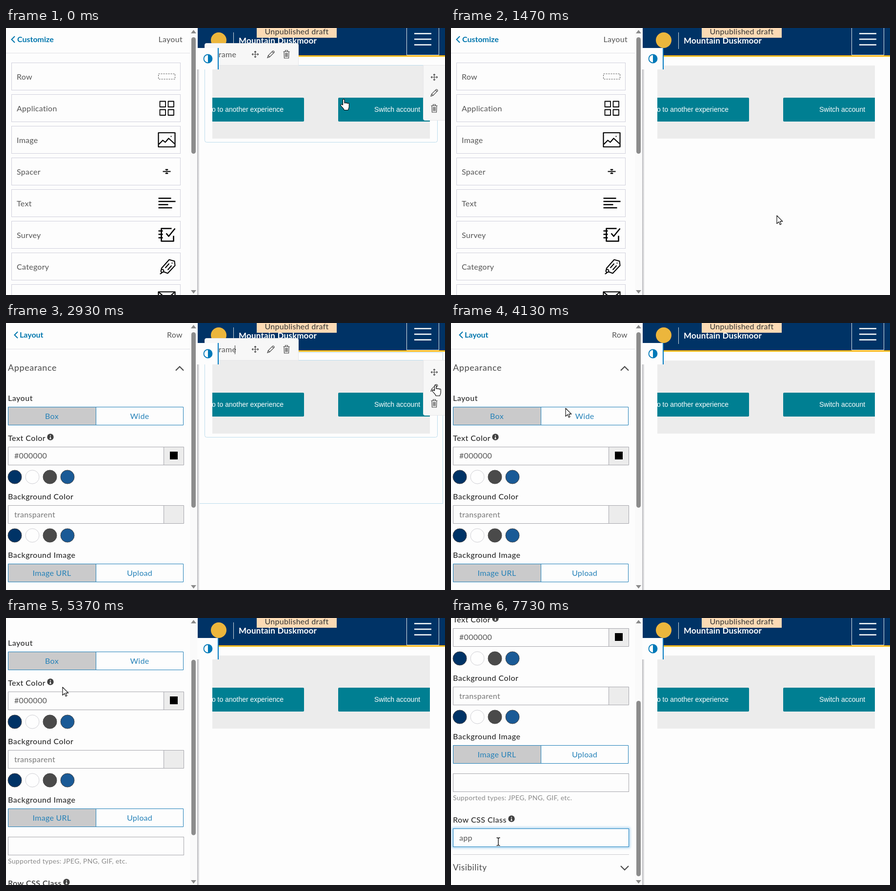
Recreate the animation shown at these times as an HTML page. Size 900 by 548 pixels, loop 8000 ms.

```html
<!DOCTYPE html>
<html lang="en">
<head>
<meta charset="utf-8">
<title>Page editor</title>
<style>
html, body { margin: 0; width: 100%; height: 100%; overflow: hidden; background: #fdfdfd; }
svg { display: block; }
#stage { width: 900px; height: 548px; }
text { font: 16px Lato, "Open Sans", sans-serif; letter-spacing: .3px; fill: #555; }
.label { font-weight: 500; letter-spacing: .5px; fill: #2a2a2a; }
.back { font-weight: 700; letter-spacing: 0; fill: #0076ad; }
.group { font-size: 18px; letter-spacing: .6px; fill: #4a4a4a; }
.hint { font-size: 14px; fill: #8a8a8a; }
.mid { text-anchor: middle; }
.end { text-anchor: end; }
.choice { text-anchor: middle; fill: #2481b8; }
.button { font: 14px "Liberation Sans", Arial, sans-serif; letter-spacing: 0; fill: #fff; text-anchor: middle; }
.title { font-size: 17px; font-weight: 700; letter-spacing: .2px; fill: #fff; }
.line { fill: none; stroke: #484848; stroke-width: 1.2; }
.chevron { fill: none; stroke: #4a4a4a; stroke-width: 2.2; }
.card, .field { fill: none; stroke: #d0d0dc; }
.field { stroke: #a6a6ac; }
.glyph { fill: none; stroke: #000; stroke-width: 2.2; stroke-linejoin: round; }
.tools { fill: #f7f7f7; stroke: #e6e6e8; }
.hover { fill: none; stroke: #bcdcec; }
.rule { stroke: #e0e0e4; }
.cursor { fill: #fff; stroke: #000; stroke-width: 1.1; stroke-linejoin: round; }
</style>
</head>
<body>
<svg id="stage" viewBox="0 0 900 548">
  <defs>
    <symbol id="move" viewBox="-8 -8 16 16"><path class="line" d="M-6.5 0H6.5M0-6.5V6.5M-4.5-2L-6.5 0L-4.5 2M4.5-2L6.5 0L4.5 2M-2-4.5L0-6.5L2-4.5M-2 4.5L0 6.5L2 4.5"/></symbol>
    <symbol id="edit" viewBox="-8 -8 16 16"><path class="line" d="M-7 7L-5.5 2.5L4-7Q7-7 7-4L-2.5 5.5ZM-5.5 2.5L-2.5 5.5M2.5-5.5L5.5-2.5"/></symbol>
    <symbol id="bin" viewBox="-8 -9 16 18"><path class="line" d="M-6.5-5.5H6.5M-2.5-5.5V-8H2.5V-5.5M-5-5.5L-4.5 8H4.5L5-5.5M-2-3V5.5M0-3V5.5M2-3V5.5"/></symbol>
    <g id="tools">
      <use href="#move" x="-8" y="-8" width="16" height="16"/>
      <use href="#edit" x="24" y="-8" width="16" height="16"/>
      <use href="#bin" x="56" y="-9" width="16" height="18"/>
    </g>
    <g id="info"><circle r="6.7" fill="#404040"/><path d="M0-3.8V-1.8M0-.6V3.6M-1.6 3.4H1.6" stroke="#fff" stroke-width="1.7"/></g>
    <g id="swatches" stroke="#444">
      <circle cx="18" cy="0" r="14" fill="#036"/>
      <circle cx="54" cy="0" r="14" fill="#fefefe" stroke="#cfcfd4"/>
      <circle cx="90" cy="0" r="14" fill="#4a4a4a"/>
      <circle cx="126" cy="0" r="14" fill="#1a5a96"/>
    </g>
    <g id="switch" stroke="#1f7fb8">
      <path d="M4.5.5H184.5V37.5H4.5Z" fill="#cacacb"/>
      <path d="M184.5.5H363.5V37.5H184.5Z" fill="none"/>
    </g>
    <g id="picker">
      <path d="M323.5.5H364.5V37.5H323.5Z" fill="#ececec"/>
      <path class="field" d="M4.5.5H364.5V37.5H4.5ZM323.5.5V37.5"/>
    </g>
    <linearGradient id="edge"><stop stop-color="#b4b4b8"/><stop offset="1" stop-color="#fdfdfd"/></linearGradient>
    <filter id="blur" x="-10%" y="-50%" width="120%" height="200%"><feGaussianBlur stdDeviation="2.5"/></filter>
    <clipPath id="frameClip"><rect x="423" y="77" width="446" height="150"/></clipPath>
  </defs>
  <rect width="900" height="548" fill="#fdfdfd"/>

  <!-- page preview -->
  <rect x="393" width="507" height="56" fill="#036"/>
  <rect x="393" y="56" width="507" height="3" fill="#fcba19"/>
  <circle cx="436" cy="25" r="16" fill="#ecb63c"/>
  <path d="M466.5 9V43" stroke="#d5dde0"/>
  <text class="title" x="477" y="32">Mountain Duskmoor</text>
  <path d="M821.5-1V55.5H887.5V-1" fill="none" stroke="#e6ebee"/>
  <path d="M837 11.5H872M837 23H872M837 34.5H872" stroke="#fff" stroke-width="2.6"/>
  <rect x="514" width="164" height="20" fill="#fcdab4"/>
  <text class="mid" x="596" y="13" style="fill:#333">Unpublished draft</text>

  <g clip-path="url(#frameClip)">
    <rect x="423" y="77" width="446" height="150" fill="#ececec"/>
    <rect x="369" y="143" width="242" height="49" rx="2" fill="#007f92"/>
    <rect x="681" y="143" width="242" height="49" rx="2" fill="#007f92"/>
    <text class="button" x="490" y="172">Go to another experience</text>
    <text class="button" x="802" y="172">Switch account</text>
  </g>

  <rect id="rowEdge" class="hover" x="396.5" y="60.5" width="499" height="310"/>
  <g id="frameHover">
    <rect class="hover" x="407.5" y="76.5" width="477" height="158" rx="4"/>
    <path class="tools" d="M407.5 76.5V35Q407.5 31.5 411 31.5H596Q599.5 31.5 599.5 35V76.5Z"/>
    <text x="423" y="60">iFrame</text>
    <path id="frameCaret" d="M469.5 46V64" stroke="#333"/>
    <use href="#tools" x="511" y="54"/>
  </g>
  <g id="textHover">
    <rect class="hover" x="407.5" y="255.5" width="477" height="99" rx="4" style="fill:#fdfdfd"/>
    <path class="tools" d="M407.5 255V214Q407.5 210.5 411 210.5H579Q582.5 210.5 582.5 214V255ZM469.5 211V255"/>
    <text x="424" y="238.5">Text</text>
    <use href="#tools" x="494" y="233"/>
  </g>
  <g id="rowTools">
    <path class="tools" d="M901 76.5H855.5V186Q855.5 189.5 859 189.5H901Z"/>
    <use href="#move" x="870" y="93" width="16" height="16"/>
    <use href="#edit" x="870" y="125" width="16" height="16"/>
    <use href="#bin" x="870" y="156" width="16" height="18"/>
  </g>
  <rect x="392" y="59" width="5" height="489" fill="url(#edge)"/>
  <rect x="392" y="41" width="42" height="44" fill="#fdfdfd"/>
  <rect x="434" y="41" width="2" height="44" fill="#0079c1"/>
  <circle cx="414" cy="63" r="8.5" fill="none" stroke="#0079b8" stroke-width="1.8"/>
  <path d="M414 54.5A8.5 8.5 0 0 1 414 71.5Z" fill="#0079b8"/>

  <!-- widget list -->
  <g id="list">
    <path d="M18 17L11.5 23.5L18 30" fill="none" stroke="#0076ad" stroke-width="2"/>
    <text class="back" x="23" y="29">Customize</text>
    <text class="end" x="362" y="29">Layout</text>
    <path class="rule" d="M0 51.5H378"/>
    <g id="cards"></g>
  </g>

  <!-- row settings -->
  <g id="settings">
    <path d="M24 18L17.5 24.5L24 31" fill="none" stroke="#0076ad" stroke-width="2"/>
    <text class="back" x="28" y="30">Layout</text>
    <text class="end" x="362" y="30">Row</text>
    <path class="rule" d="M0 53.5H378"/>
    <text class="group" x="4" y="98">Appearance</text>
    <path class="chevron" d="M348 97.5L356 89.5L364 97.5"/>
    <text class="label" x="4" y="160">Layout</text>
    <use href="#switch" y="172"/>
    <text class="choice" x="94" y="196.5">Box</text>
    <text class="choice" x="274" y="196.5">Wide</text>
    <text class="label" x="4" y="242">Text Color</text>
    <use href="#info" x="91" y="234"/>
    <use href="#picker" y="254"/>
    <rect x="336" y="264" width="16" height="16"/>
    <text x="17" y="278">#000000</text>
    <use href="#swatches" y="316"/>
    <text class="label" x="4" y="362">Background Color</text>
    <use href="#picker" y="374"/>
    <text x="17" y="398.5" style="fill:#787878">transparent</text>
    <use href="#swatches" y="436"/>
    <text class="label" x="4" y="482">Background Image</text>
    <use href="#switch" y="494"/>
    <text class="choice" x="94" y="518.5">Image URL</text>
    <text class="choice" x="274" y="518.5">Upload</text>
    <rect class="field" x="4.5" y="552.5" width="360" height="37"/>
    <text class="hint" x="4" y="607">Supported types: JPEG, PNG, GIF, etc.</text>
    <text class="label" x="4" y="653">Row CSS Class</text>
    <use href="#info" x="124" y="645"/>
    <rect class="field" x="4.5" y="665.5" width="360" height="37"/>
    <g id="focus">
      <rect x="4.5" y="665.5" width="360" height="37" fill="none" stroke="#8cc4ea" stroke-width="4" filter="url(#blur)"/>
      <rect x="4.5" y="665.5" width="360" height="37" fill="#fdfdfd" stroke="#1f82c0"/>
    </g>
    <text id="typed" x="17" y="690"></text>
    <path id="caret" d="M.5 674.5V692.5" stroke="#333"/>
    <path d="M4 718.5H365" stroke="#ccccd0"/>
    <text class="group" x="4" y="751" style="font-size:17px">Visibility</text>
    <path class="chevron" d="M348 742L356 750L364 742"/>
  </g>

  <rect x="377" width="15" height="548" fill="#fafafa"/>
  <path d="M379 11L384.5 4L390 11ZM379 538L384.5 545L390 538Z" fill="#8a8a8a"/>
  <rect id="thumb" x="380" width="9" rx="4.5" fill="#8c8c8c"/>

  <g id="pointer">
    <path id="arrow" class="cursor" d="M0 0V16.5L4 12.8L6.5 18.7L9 17.6L6.5 11.9H11.8Z"/>
    <path id="hand" class="cursor" transform="translate(-7 -1)" d="M5.5 13V2.8a1.7 1.7 0 0 1 3.4 0V9.5a1.6 1.6 0 0 1 3.2 .3a1.6 1.6 0 0 1 3.2 .6a1.5 1.5 0 0 1 3 .8V16.5c0 3-1.6 4.4-2 7H8.3C7.8 20.5 4 18 1.5 14.2c-1-1.7 1-3.2 2.5-1.9Z"/>
    <path id="beam" d="M-3.5-8Q0-8 0-6.5Q0-8 3.5-8M0-7V7M-3.5 8Q0 8 0 6.5Q0 8 3.5 8" fill="none" stroke="#000" stroke-width="1.3"/>
  </g>
</svg>
<script>
const LOOP = 8000;
const el = id => document.getElementById(id);
const show = (id, on) => el(id).setAttribute("visibility", on ? "visible" : "hidden");

// Glyph paths are drawn around the centre of each card's icon.
const widgets = [
  ["Row", "M-17-5.5H17V5.5H-17Z", "stroke-dasharray='3 2' style='stroke-width:1;stroke:#555'"],
  ["Application", "M-14-14H-2.5V-2.5H-14ZM3-14H14.5V-2.5H3ZM-14 3H-2.5V14.5H-14ZM3 3H14.5V14.5H3Z", "style='stroke-width:1.8'"],
  ["Image", "M-17-14.5H17V14.5H-17ZM-16 9L-8 1L-3 5L4-3L16 8M8-7H10"],
  ["Spacer", "M-8 0H8M-2-4L0-3L2-4ZM-2 4L0 3L2 4Z", "style='stroke-width:2'"],
  ["Text", "M-17-10H9M-17-3.5H18M-17 3H3M-17 9.5H11", "style='stroke-width:2.6'"],
  ["Survey", "M10-13H-11V13H14V2M-17-8H-8M-17-1H-8M-17 6H-8M-1-3L4 3L17-13", "style='stroke-width:2.6'"],
  ["Category", "M-11 4L5-14L16-11L17-2L2 14L-6 11M-3 3L5-6M2 7L10-2M-11 4V8M-6 9A3 3 0 1 1-6 8.9M-9 11Q-11 15-14 15M10-7H12", "style='stroke-width:2'"],
  ["Email", "M-17-13H17V13H-17ZM-17-13L0 2L17-13"],
];
el("cards").innerHTML = widgets.map(([name, path, extra = ""], i) =>
  `<g transform="translate(0 ${71 + 65 * i})">
    <rect class="card" x="11.5" y=".5" width="346" height="56"/>
    <text x="22" y="34.5">${name}</text>
    <path class="glyph" transform="translate(329.5 28.5)" d="${path}" ${extra}/>
  </g>`).join("");

// Each row: time, then values at that time.
const route = [
  [30, 692, 146], [150, 690, 160], [400, 674, 238], [670, 664, 302], [830, 668, 350],
  [900, 668, 350], [930, 668, 385], [1470, 668, 385], [1600, 690, 330], [1900, 690, 330],
  [2000, 775, 240], [2100, 853, 141], [2300, 866, 126], [2670, 880, 127], [3370, 880, 127],
  [3500, 820, 135], [3750, 570, 165], [4000, 300, 180], [4200, 200, 172], [4500, 116, 142],
  [5600, 116, 142], [5700, 112, 210], [5880, 100, 410], [6000, 97, 459],
];
const scrolls = [[4550, 0], [4830, 102], [5370, 102], [5650, 233]];
const easeOut = u => 1 - (1 - u) ** 2;

function sample(keys, t, ease = u => u) {
  const i = keys.findIndex(k => k[0] > t);
  if (i === 0) return keys[0].slice(1);
  if (i < 0) return keys[keys.length - 1].slice(1);
  const a = keys[i - 1], b = keys[i];
  const u = ease((t - a[0]) / (b[0] - a[0]));
  return a.slice(1).map((v, k) => v + (b[k + 1] - v) * u);
}

function draw(t) {
  const [x, y] = sample(route, t);
  const [scroll] = sample(scrolls, t, easeOut);
  const editing = t >= 2900;

  const inRow = x > 396 && y < 371;
  const inFrame = inRow && y < 240;
  const inField = x < 365 && editing && y + scroll > 665 && y + scroll < 703;
  show("rowTools", inRow);
  show("rowEdge", inRow && x > 866);
  show("frameHover", inFrame);
  show("frameCaret", inFrame && editing);
  show("textHover", inRow && !inFrame);

  show("hand", inRow);
  show("beam", inField);
  show("arrow", !inRow && !inField);
  el("pointer").setAttribute("transform", `translate(${Math.round(x)} ${Math.round(y)})`);

  show("list", !editing);
  show("settings", editing);
  el("settings").setAttribute("transform", `translate(0 ${-Math.round(scroll)})`);
  el("thumb").setAttribute("y", 19 + scroll * 0.648);
  el("thumb").setAttribute("height", editing ? 360 : 239);

  const count = [7070, 7270, 7470].filter(s => t >= s).length;
  el("typed").textContent = "app".slice(0, count);
  el("focus").setAttribute("opacity", Math.min(1, Math.max(0, (t - 6170) / 200)));
  show("caret", t >= 6040 && t < 7730);
  el("caret").setAttribute("transform", `translate(${[17, 26, 35, 45][count]} 0)`);
}

function tick() {
  draw(performance.now() % LOOP);
  requestAnimationFrame(tick);
}
tick();
</script>
</body>
</html>
```
